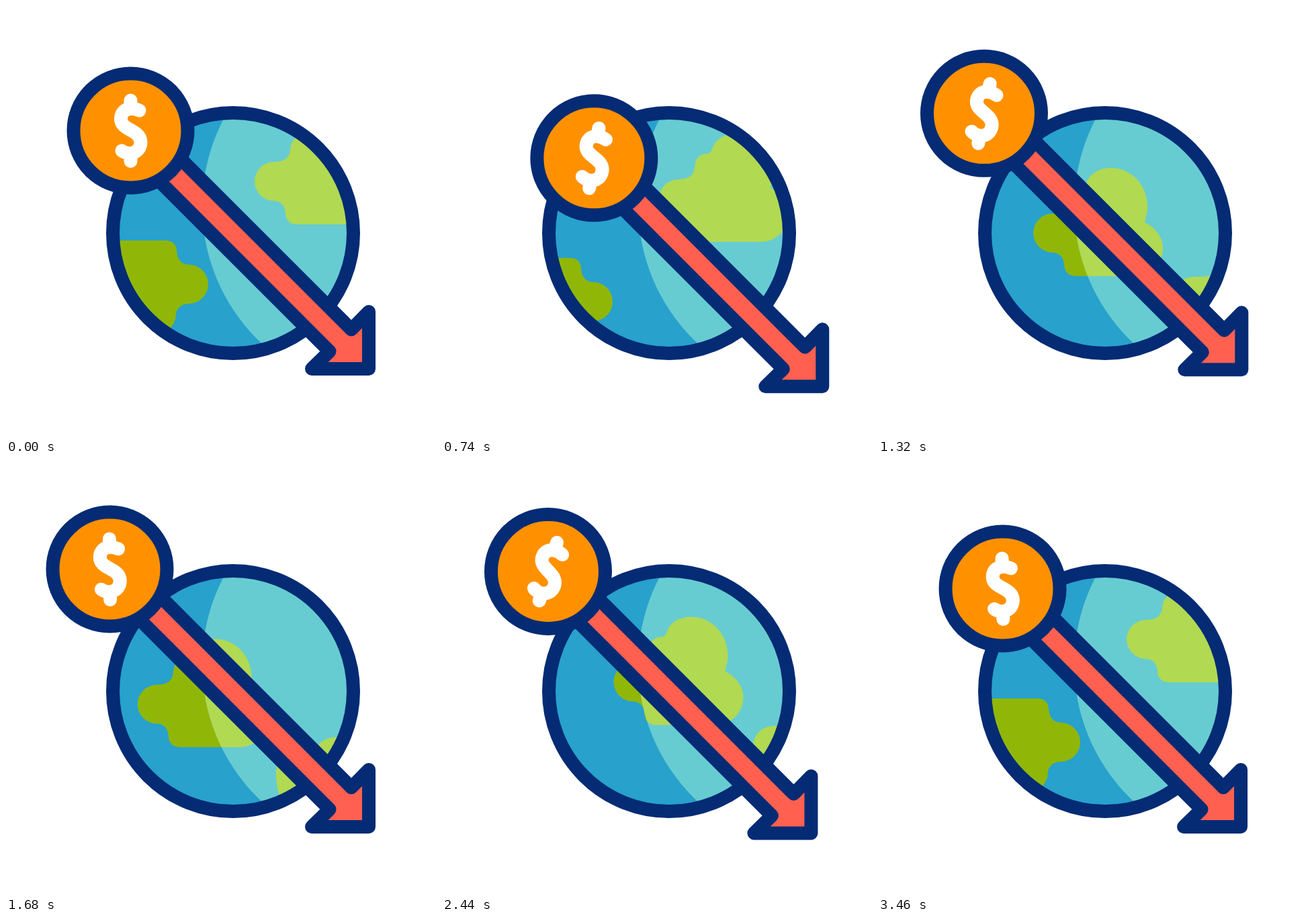
Animation of 640x640 px, one loop 3.6 s. Source, as an HTML page:

```html
<!DOCTYPE html>
<html lang="en">
<head>
<meta charset="utf-8">
<title>Falling coin and globe</title>
<style>
  html, body { margin: 0; height: 100%; overflow: hidden; background: #fff; }
  svg { display: block; width: 100%; height: 100%; }
  .line { stroke: #042b74; stroke-width: 20; stroke-linejoin: round; }
</style>
</head>
<body>
<svg viewBox="0 0 640 640">
  <defs>
    <clipPath id="globe"><circle cx="338" cy="338" r="175"/></clipPath>
    <clipPath id="day"><circle cx="572" cy="298" r="280"/></clipPath>
    <g id="land">
      <path d="M150 349H238Q253 350 254 364Q255 384 272 385A29 29 0 0 1 272 443Q255 444 253 458Q253 472 242 482L150 510Z"/>
      <g transform="translate(138 -77)">
        <path d="M261 309Q283 309 285 292Q286 272 302 271Q309 271 311 264C315 250 330 241 347 241C378 241 402 266 402 300C402 310 399 314 398 322C413 329 425 344 425 361A41 41 0 0 1 384 402H295Q279 401 278 386Q277 368 261 367A29 29 0 0 1 261 309Z"/>
        <path d="M445 510Q446 480 442 470Q438 455 438 440Q440 403 475 403H483Q498 403 506 394Q514 387 530 387H640V510Z"/>
      </g>
    </g>
  </defs>

  <g clip-path="url(#globe)">
    <rect width="640" height="640" fill="#28a1cc"/>
    <use class="land" href="#land" fill="#90b707"/>
    <g clip-path="url(#day)">
      <rect width="640" height="640" fill="#67ccd1"/>
      <use class="land" href="#land" fill="#b1d952"/>
    </g>
  </g>
  <circle class="line" cx="338" cy="338" r="179" fill="none"/>

  <path id="arrow" class="line" fill="#ff6050"/>

  <g id="coin">
    <circle class="line" r="85" fill="#ff9100"/>
    <path id="dollar" fill="none" stroke="#fff" stroke-width="20" stroke-linecap="round"
      d="M13 -30C3 -35 -14 -34 -14.5 -18C-15 0 14.5 -2 15 17C15 33 -2 38 -13 30M0 -45V-34M0 45.5V34"/>
  </g>
</svg>
<script>
const LOOP = 3600, START = 200;
const $ = id => document.getElementById(id);
const lands = document.querySelectorAll('.land');

// Eased 0 to 1 between two times.
function step(t, from, to) {
  const u = Math.min(1, Math.max(0, (t - from) / (to - from)));
  return u * u * (3 - 2 * u);
}

// Eased 0 to 1 and back, each way taking the given time.
const pulse = (t, from, half) =>
  step(t, from, from + half) - step(t, from + half, from + 2 * half);

function draw(t) {
  // The globe turns there and back.
  const turn = pulse(t, START, 1600);
  lands.forEach(l => l.setAttribute('transform', `translate(${-177 * turn} ${98 * turn})`));

  // The coin pushes in, flies out, bobs once and comes home.
  const x = 185.5 + 42 * step(t, START, 800) - 73 * step(t, 800, 1400)
    + 10 * pulse(t, 1800, 400) + 26 * step(t, 2600, 3000) + 5 * step(t, 3000, 3400);
  const y = x + 2 * (step(t, 800, 1400) - step(t, 3000, 3400));
  $('coin').setAttribute('transform', `translate(${x} ${y})`);

  // The dollar sign makes eleven half swings.
  const swings = Math.min(11, Math.max(0, (t - START) / 297));
  $('dollar').setAttribute('transform', `rotate(${-17 * Math.sin(swings * Math.PI)})`);

  // One slow thrust of the arrow, then two quick ones.
  const tip = 540 + 27 * (pulse(t, START, 600) + pulse(t, 1800, 400) + pulse(t, 2600, 400));
  const tail = (x + y) / 2, w = 16.25;
  const near = tip - 26, far = near - 2 * w, barb = tip - 85;
  $('arrow').setAttribute('d',
    `M${tail + w} ${tail - w}L${near} ${far}L${tip} ${barb}V${tip}H${barb}L${far} ${near}L${tail - w} ${tail + w}Z`);
}

const begin = performance.now();
function tick() {
  draw((performance.now() - begin) % LOOP);
  requestAnimationFrame(tick);
}
tick();
</script>
</body>
</html>
```
